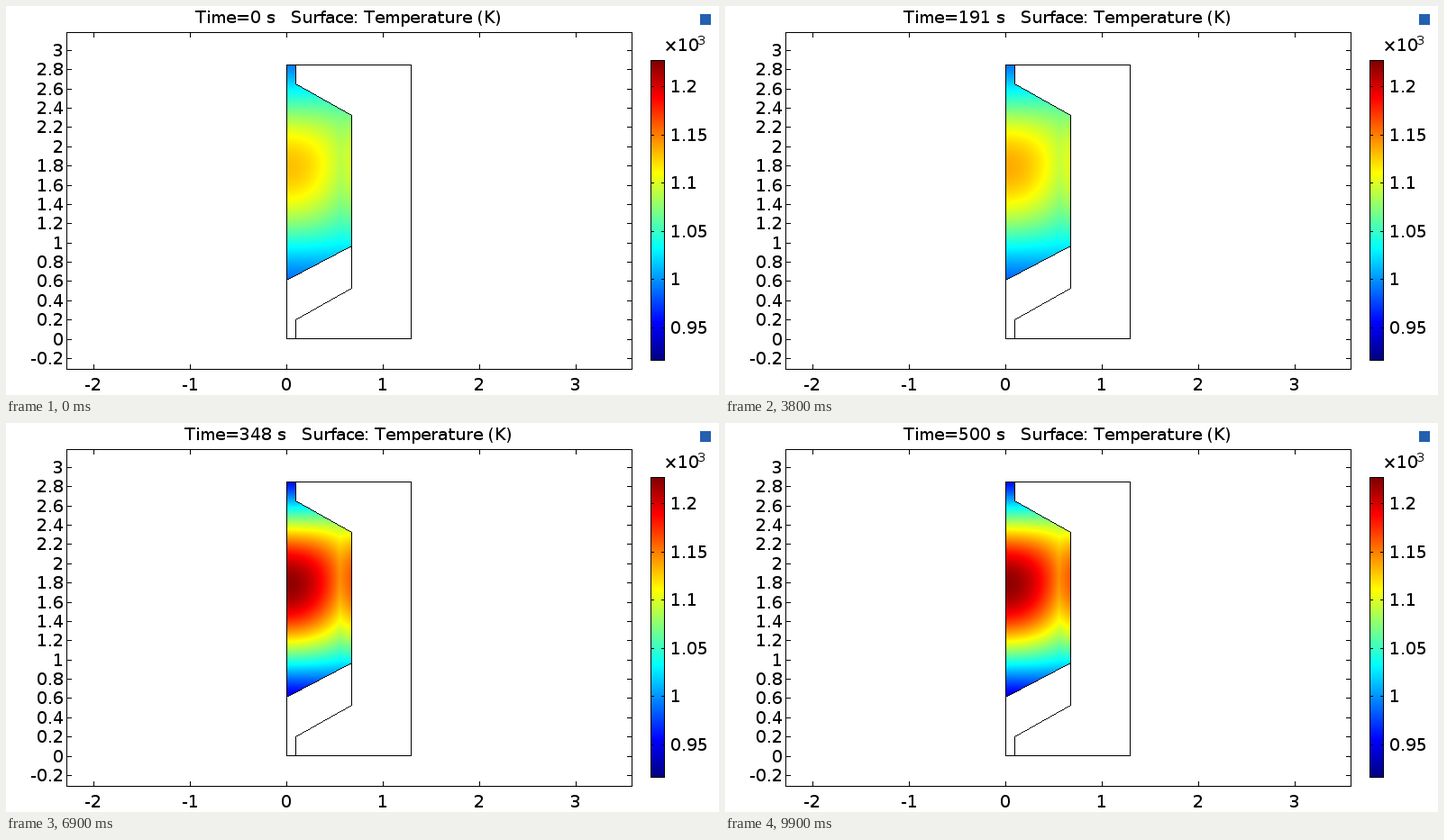
A matplotlib script that plays this animation: 791 by 432 pixels, repeating every 10000 ms.

```python
import numpy as np
import matplotlib.pyplot as plt
from matplotlib.animation import FuncAnimation
from matplotlib.patches import Rectangle

W, H, DPI = 791, 432, 64
PX = 72 / DPI                 # points per pixel
FRAMES, INTERVAL, T_END = 100, 100, 500
T_MIN, T_MAX = 916.5, 1227    # colour range in kelvin
SCALE, X0, Y0 = 106.85, 311, 369.5

plt.rcParams.update({"font.family": "DejaVu Sans", "text.hinting": "native",
                     "text.hinting_factor": 1, "text.kerning_factor": 6})
fig = plt.figure(figsize=(W / DPI, H / DPI), dpi=DPI, facecolor="white")
ax = fig.add_axes([0, 0, 1, 1])
ax.axis("off")
ink = np.zeros((H, W, 4))     # crisp one-pixel line work


def line(*pts):
    for (xa, ya), (xb, yb) in zip(pts, pts[1:]):
        n = max(abs(xb - xa), abs(yb - ya)) + 1
        x = np.rint(np.linspace(xa, xb, n)).astype(int)
        y = np.rint(np.linspace(ya, yb, n)).astype(int)
        ink[y, x, 3] = 1


def box(x0, y0, x1, y1):
    line((x0, y0), (x1, y0), (x1, y1), (x0, y1), (x0, y0))


def label(x, y, s, ha="left", size=18.67):
    return ax.text(x, y, s, ha=ha, va="baseline", fontsize=size * PX, color="black")


def picture(data, x0, y0, z=2):
    h, w = data.shape[:2]
    return ax.imshow(data, extent=(x0, x0 + w, y0 + h, y0), aspect="auto",
                     interpolation="nearest", zorder=z)


def rainbow(kelvin):
    v = np.clip((kelvin - T_MIN) / (T_MAX - T_MIN), 0, 1)
    return np.clip(1.5 - np.abs(4 * v[..., None] - [3, 2, 1]), 0, 1)


# Heated region: round hot spot on the axis, with a warmer rim at the wall
x, y = np.meshgrid(np.arange(311, 384), np.arange(65, 305))
roof = np.where(x <= 321, 65, 86 + (x - 321) * 35 / 62)
floor = 304 - (x - 311) * 38 / 72
inside = ((y >= roof) & (y <= floor)).astype(float)

r, d = x - 311, y - 178.0
d = np.where(d < 0, 1.06 * d, d)
r_eff = np.where(r < 59, 0.9 * r, 53 - 0.5 * (r - 59))
dist = np.sqrt(d**2 + r_eff**2 * np.cos(np.pi * (d - 12) / 180))
shape = 0.27 + np.cos(0.0205 * dist)


def surface(t):
    step = 1 - np.exp(-(max(t - 200, 0) / 57.6) ** 2.5)
    amp = 77 + 5 * (1 - np.exp(-t / 12))
    amp += (150 - amp) * step
    return np.dstack([rainbow(1032 + amp * shape), inside])


img = picture(surface(0), 311, 65)
box(311, 65, 449, 369)
line((321, 65), (321, 86), (383, 121), (383, 313), (321, 348), (321, 369))
line((311, 304), (383, 266))

# Axes frame with inward ticks
box(67, 29, 694, 403)
for v in np.arange(-1, 16) / 5:
    ty = round(Y0 - SCALE * v)
    line((67, ty), (72, ty))
    line((689, ty), (694, ty))
    label(64, ty + 7, f"{v:g}", "right")
for v in range(-2, 4):
    tx = round(X0 + SCALE * v)
    line((tx, 29), (tx, 34))
    line((tx, 398), (tx, 403))
    label(tx, 427, str(v), "center")

# Colour legend
ramp = np.linspace(T_MAX, T_MIN, 334)[:, None].repeat(16, axis=1)
picture(rainbow(ramp), 715, 60)
box(715, 60, 730, 393)
for v in np.arange(0.95, 1.21, 0.05):
    ty = round(60 + 333 * (T_MAX - 1000 * v) / (T_MAX - T_MIN))
    line((715, ty), (718, ty))
    line((727, ty), (730, ty))
    label(737, ty + 7, f"{v:g}")
label(729, 50, "×10")
label(767, 43, "3", size=14)

picture(ink, 0, 0, z=3)
ax.add_patch(Rectangle((770, 9), 12, 12, color="#2560b0", lw=0))
title = label(379.5, 19, "", "center")
ax.set_xlim(0, W)
ax.set_ylim(H, 0)


def update(i):
    t = T_END * i / (FRAMES - 1)
    title.set_text(f"Time={int(t)} s   Surface: Temperature (K)")
    img.set_data(surface(t))
    return title, img


anim = FuncAnimation(fig, update, frames=FRAMES, interval=INTERVAL,
                     repeat=True, repeat_delay=0)
plt.show()
```
